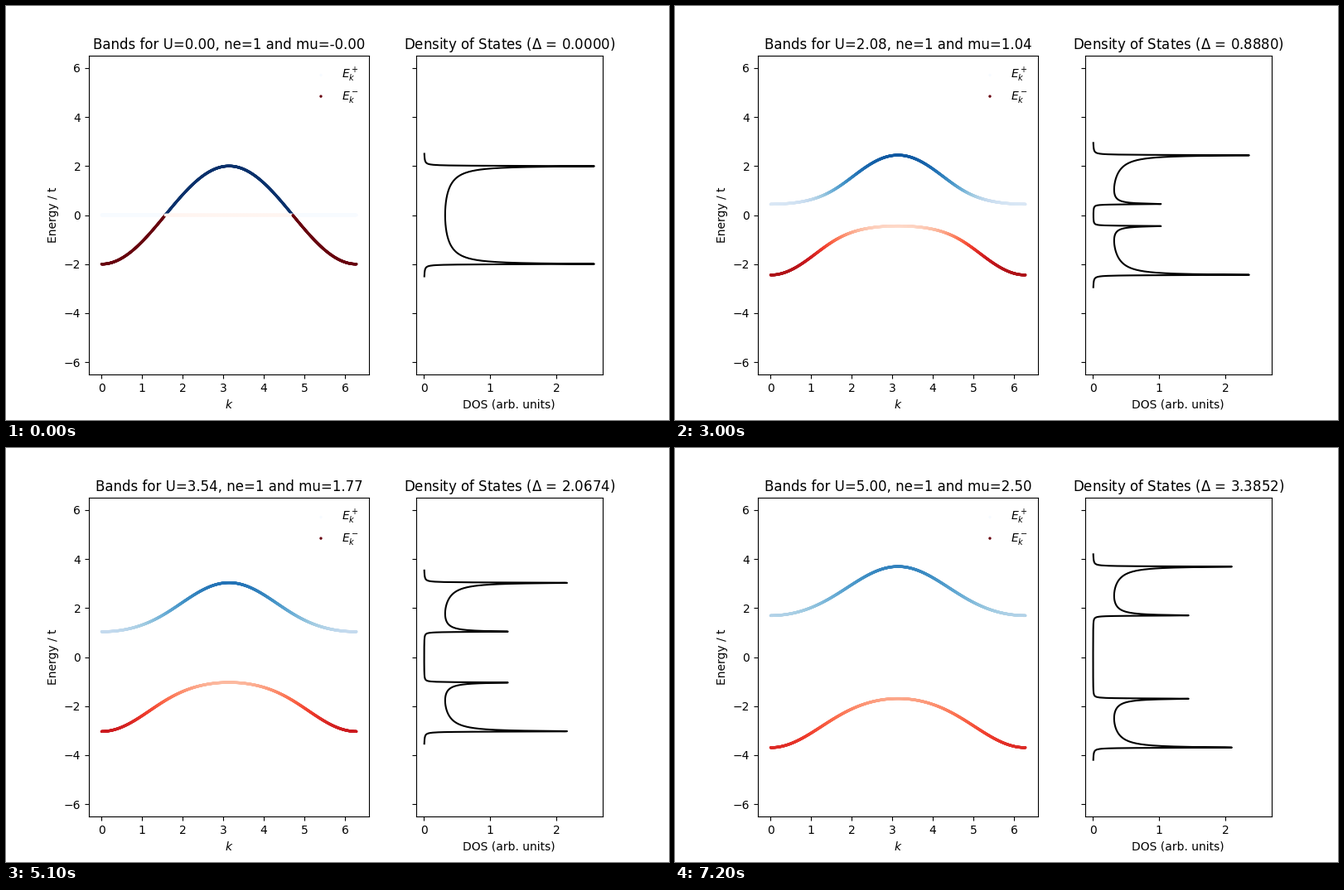
Animation, 800 px wide and 500 px high, one loop 7.5 s. Source, as a matplotlib script:

```python
import numpy as np
import matplotlib.pyplot as plt
from matplotlib.animation import FuncAnimation

FRAMES = 25
ETA = 0.01  # Lorentzian broadening

k = np.linspace(0, 2 * np.pi, 1000)
half = -np.cos(k)  # half of the bare dispersion -2 cos k
u_values = np.linspace(0, 5, FRAMES)


def bands(v):
    """Energies and dispersive weights of the hybridised bands."""
    root = np.sqrt(half**2 + v**2)
    upper, lower = half + root, half - root
    return upper, (1 + half / root) / 2, lower, (1 - half / root) / 2


def density(v):
    """Broadened density of states on a grid just wider than the bands."""
    edge = 1 + np.sqrt(1 + v**2) + 0.5
    energy = np.linspace(-edge, edge, 1000)
    z = energy + 1j * ETA
    zeta = z - v**2 / z
    green = 1 / (np.sqrt(zeta - 2) * np.sqrt(zeta + 2))
    return -2 / np.pi * green.imag, energy


fig, (ax_band, ax_dos) = plt.subplots(
    1, 2, sharey=True, figsize=(8, 5), dpi=100,
    gridspec_kw={"width_ratios": [3, 2]})

up, w_up, low, w_low = bands(0)
dots = dict(s=2, vmin=0, vmax=1)
plus = ax_band.scatter(k, up, c=w_up, cmap="Blues", label="$E_k^+$", **dots)
minus = ax_band.scatter(k, low, c=w_low, cmap="Reds", label="$E_k^-$", **dots)
ax_band.set_xlabel("$k$")
ax_band.set_ylabel("Energy / t")
ax_band.set_ylim(-6.5, 6.5)
ax_band.legend(loc="upper right", frameon=False)
band_title = ax_band.set_title("")

line, = ax_dos.plot(*density(0), color="black")
ax_dos.set_xlim(ax_dos.get_xlim())
ax_dos.set_ylim(-6.5, 6.5)
ax_dos.set_xlabel("DOS (arb. units)")
dos_title = ax_dos.set_title("")


def update(i):
    u = u_values[i]
    v = u / 2
    up, w_up, low, w_low = bands(v)
    for dots, e, w in ((plus, up, w_up), (minus, low, w_low)):
        dots.set_offsets(np.column_stack((k, e)))
        dots.set_array(w)
    line.set_data(*density(v))
    mu = v or -0.0
    gap = 2 * (np.sqrt(1 + v**2) - 1)
    band_title.set_text(f"Bands for U={u:.2f}, ne=1 and mu={mu:.2f}")
    dos_title.set_text(rf"Density of States ($\Delta$ = {gap:.4f})")
    return plus, minus, line, band_title, dos_title


anim = FuncAnimation(fig, update, frames=FRAMES, interval=300,
                     repeat=True, repeat_delay=0, blit=False)
plt.show()
```
